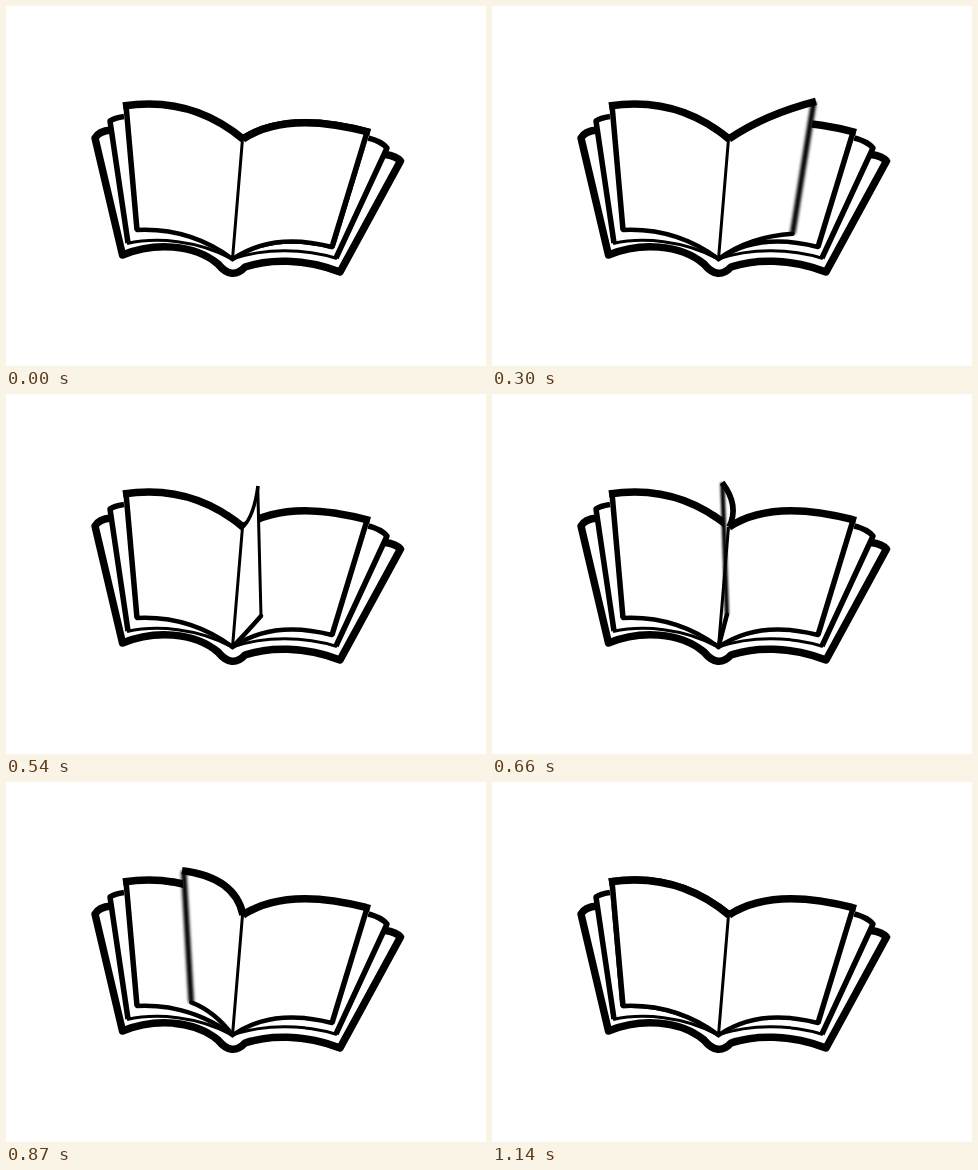
An HTML page that plays this animation: 480 by 360 pixels, repeating every 1170 ms.

```html
<!DOCTYPE html>
<html lang="en">
<head>
<meta charset="utf-8">
<title>Turning page</title>
<style>
  html, body { margin: 0; width: 100%; height: 100%; overflow: hidden; background: #fff; }
  svg { display: block; width: 480px; height: 360px; }
  path { fill: none; stroke: #000; stroke-linejoin: round; }
  .paper { fill: #fff; stroke: none; }
  .thick { stroke-width: 7.5; }
  .mid { stroke-width: 5.5; }
  .low { stroke-width: 4.5; stroke-linecap: round; }
  .thin { stroke-width: 3; }
</style>
</head>
<body>
<svg viewBox="0 0 480 360">
  <defs>
    <filter id="soft" filterUnits="userSpaceOnUse" x="0" y="0" width="480" height="360">
      <feGaussianBlur id="blur" stdDeviation="0"/>
    </filter>
  </defs>

  <!-- cover -->
  <path class="thick" d="M105,124Q93,125 89,132L116.5,249C148,236 188,238 212,258Q226,275 239,261C262,253 298,252 334,266L394.5,155Q390,150 379,148.5"/>

  <!-- inner sheets -->
  <path class="mid" d="M118,110.5Q108,112 104,115L122,237M362,132Q375,135 381,142L330,252"/>
  <path class="thin" d="M121,237.5C150,231 192,234 226,253C258,242 298,242 331,252.5"/>

  <g id="still"></g>
  <g id="turning"></g>
  <path class="thin" d="M236.5,133L226.5,253"/>
</svg>
<script>
const LOOP = 1170, STEP = 30, UPRIGHT = 540, DOWN = 1140;
const HEAD = [237, 133], FOOT = [226.5, 253];

// Page shapes: free corners and the control points of the curves to the spine
const right = { tip: [364, 126.5], arch: [281, 104], heel: [326, 241], sag: [267, 225.5] };
const upright = { tip: [252, 92], arch: [248, 122], heel: [255, 222], sag: [240, 239] };
const left = { tip: [117, 100], arch: [185, 89.5], heel: [131, 224], sag: [184, 221.5] };

const mix = (a, b, q) => a.map((v, i) => v + (b[i] - v) * q);

// Blend two shapes, raised by lift and rounded by bulge on the way
function bend(from, to, q, lift, bulge) {
  const page = {};
  for (const k in from) page[k] = mix(from[k], to[k], q);
  page.tip[1] -= lift;
  page.heel[1] -= lift * 0.35;
  page.arch[0] += bulge;
  page.arch[1] -= bulge * 0.5;
  return page;
}

function pageAt(t) {
  if (t < UPRIGHT) {
    const w = t / UPRIGHT, s = Math.sin(Math.PI * w);
    return { ...bend(right, upright, w ** 1.75, 19 * s, 4 * s), blur: 1.6 * s };
  }
  const w = Math.min((t - UPRIGHT) / (DOWN - UPRIGHT), 1), s = Math.sin(Math.PI * w);
  const q = w - 0.04 * Math.sin(2 * Math.PI * w);
  return { ...bend(upright, left, q, 8 * s, 17 * s), blur: 1.8 * s };
}

function makePage(parent) {
  const add = cls => {
    const p = document.createElementNS('http://www.w3.org/2000/svg', 'path');
    p.setAttribute('class', cls);
    return document.getElementById(parent).appendChild(p);
  };
  return { paper: add('paper'), edge: add('mid'), low: add('low'), top: add('thick') };
}

function drawPage(parts, { tip, arch, heel, sag }) {
  const [x, y] = tip;
  const spread = Math.min(Math.abs(x - upright.tip[0]) / 40, 1);
  const inset = (x - 240) / 40;
  const top = `M${HEAD}Q${arch} ${tip}`;
  const low = `Q${sag} ${FOOT}`;
  parts.paper.setAttribute('d', `${top}L${heel}${low}Z`);
  parts.top.setAttribute('d', top);
  parts.edge.setAttribute('d', `M${x - inset},${y}L${heel}`);
  parts.low.setAttribute('d', `M${heel}${low}`);
  parts.top.style.strokeWidth = 3.5 + 4 * spread;
  parts.edge.style.strokeWidth = 3 + 2.5 * spread;
}

drawPage(makePage('still'), right);
drawPage(makePage('still'), left);

const leaf = makePage('turning');
const blur = document.getElementById('blur');
leaf.edge.setAttribute('filter', 'url(#soft)');

function render(now) {
  const page = pageAt(Math.floor((now % LOOP) / STEP) * STEP);
  drawPage(leaf, page);
  blur.setAttribute('stdDeviation', page.blur);
  requestAnimationFrame(render);
}
render(0);
</script>
</body>
</html>
```
